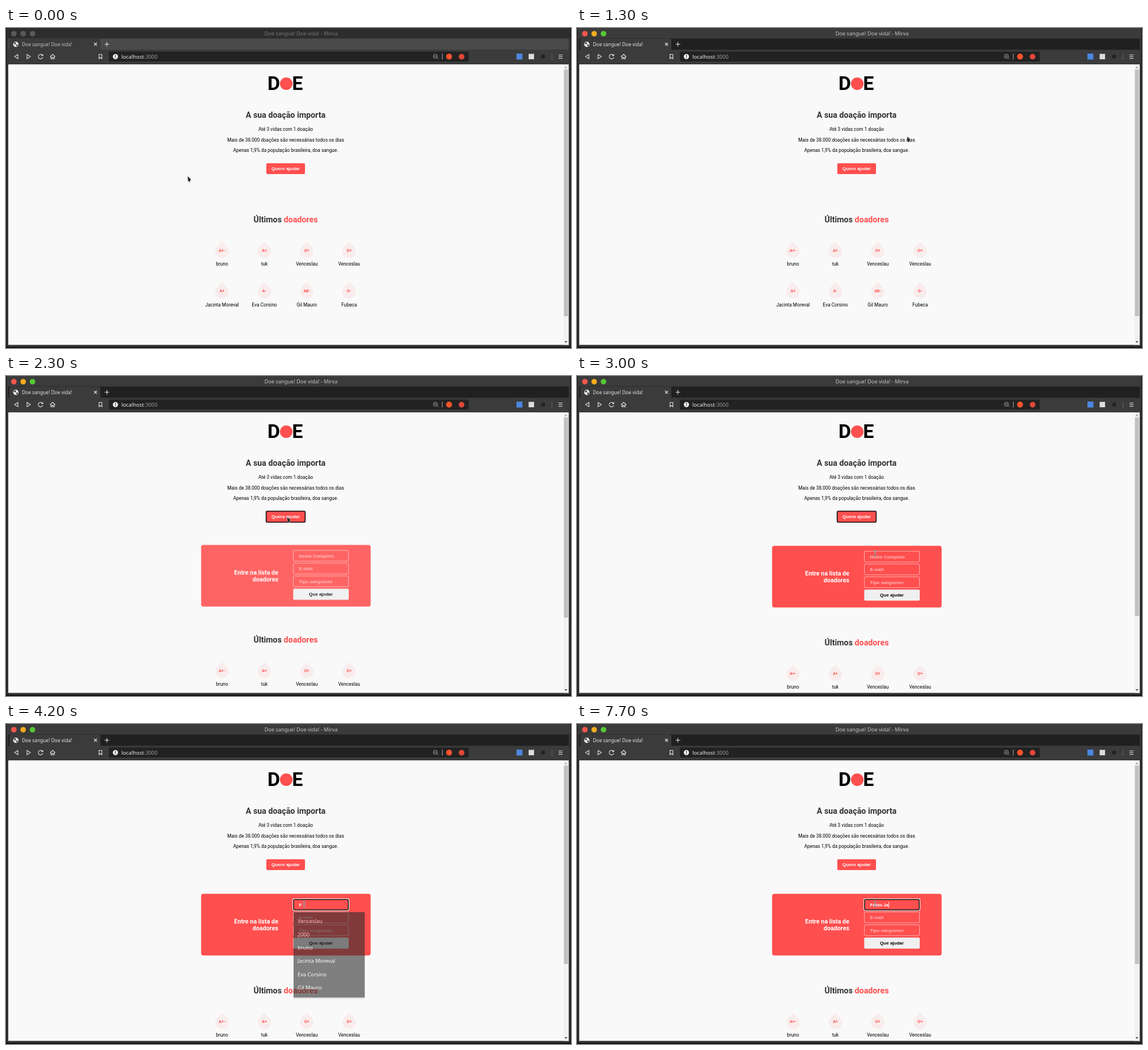
Animation, 994 px wide and 563 px high, one loop 8000 ms. Source, as an HTML page:

```html
<!DOCTYPE html>
<html lang="pt-BR">
<head>
<meta charset="utf-8">
<title>Doe sangue! Doe vida!</title>
<style>
html, body { margin: 0; width: 100%; height: 100%; overflow: hidden; background: #111; }
svg { display: block; width: 994px; height: 563px; }
text { font-family: Roboto, sans-serif; font-size: 8.35px; fill: #000; white-space: pre; }
.mid { text-anchor: middle; }
.ui { font-family: "Noto Sans", sans-serif; }
.ctl { font: bold 8px "Liberation Sans", Arial, sans-serif; }
.h2 { font-size: 14.25px; font-weight: 700; fill: #333; }
.logo { font-size: 34px; font-weight: 700; }
.type { font-size: 7px; font-weight: 700; fill: #ff4f4f; }
.hint { fill: #fff; opacity: .6; }
.line { fill: none; stroke: #e4e4e4; stroke-width: 1.1; }
.field { fill: none; stroke: #fff; stroke-opacity: .55; }

.anim { animation: 8s step-end infinite; }
#titlebar { animation-name: titlebar; }
#strip { animation-name: strip; }
#caption { animation-name: caption; }
#lights { animation-name: lights; }
#tabtext { animation-name: tabtext; }
#arrow { animation-name: arrow; }
#beam { animation-name: beam; }
#ring { animation-name: ring; }
#donors { animation-name: donors; }
#thumb { animation-name: thumb; }
#form { animation-name: form; }
#hint { animation-name: hint; }
#focus { animation-name: focus; }
#menu { animation-name: menu; }

@keyframes titlebar { 0% { fill: #2d2d2d } 3.75%, 100% { fill: #3b3b3b } }
@keyframes strip { 0% { fill: #4a4a4a } 3.75%, 100% { fill: #202020 } }
@keyframes caption { 0% { fill: #777 } 3.75%, 100% { fill: #c6c6c6 } }
@keyframes tabtext { 0% { fill: #c4c4c4 } 3.75%, 100% { fill: #e6e6e6 } }
@keyframes lights { 0% { opacity: 0 } 3.75%, 100% { opacity: 1 } }
@keyframes arrow {
  0% { transform: translate(319px, 260px); opacity: 1 }
  8.75% { transform: translate(345px, 290px) }
  10% { transform: translate(420px, 358px) }
  11.25% { transform: translate(530px, 389px) }
  12.5% { transform: translate(660px, 370px) }
  13.75% { transform: translate(741px, 290px) }
  15% { transform: translate(690px, 205px) }
  16.25% { transform: translate(580px, 190px) }
  17.5% { transform: translate(500px, 243px) }
  21.25% { transform: translate(494px, 247px); opacity: 1 }
  37.5%, 100% { transform: translate(494px, 247px); opacity: 0 }
}
@keyframes beam {
  0% { transform: translate(524.5px, 312px); opacity: 0 }
  37.5% { transform: translate(524.5px, 312px); opacity: 1 }
  38.75%, 100% { transform: translate(524.5px, 316.5px); opacity: 1 }
}
@keyframes ring { 0% { opacity: 0 } 25% { opacity: 1 } 38.75%, 100% { opacity: 0 } }
@keyframes donors {
  0% { transform: none }
  26.25% { transform: translateY(90px) }
  27.5% { transform: translateY(111px) }
  28.75% { transform: translateY(127px) }
  30%, 100% { transform: translateY(132px) }
}
@keyframes thumb {
  0% { height: 434px }
  26.25% { height: 373px }
  27.5% { height: 360px }
  28.75% { height: 352px }
  30%, 100% { height: 349px }
}
@keyframes form {
  0%, 26.25% { transform: translateY(-12px); opacity: 0 }
  27.5% { transform: translateY(-6px); opacity: .5 }
  28.75% { transform: translateY(-1.5px); opacity: .88 }
  30%, 100% { transform: none; opacity: 1 }
}
@keyframes hint { 0% { opacity: .6 } 38.75%, 100% { opacity: 0 } }
@keyframes focus { 0% { opacity: 0 } 38.75%, 100% { opacity: 1 } }
@keyframes menu {
  0% { opacity: 0 }
  38.75% { opacity: .6 }
  40% { opacity: 1 }
  52.5% { opacity: .6 }
  53.75%, 100% { opacity: 0 }
}
</style>
</head>
<body>
<svg viewBox="0 0 994 563">
  <defs>
    <clipPath id="view"><rect x="4" y="64" width="977" height="493.5"/></clipPath>
    <path id="drop" d="M0-16C3-11 12-6 12 1A12 12 0 0 1-12 1C-12-6-3-11 0-16Z" fill="#f9ecec"/>
  </defs>

  <!-- browser window -->
  <rect width="994" height="563" fill="#111"/>
  <rect x="1" width="992" height="561" rx="3" fill="#353535"/>
  <rect id="titlebar" class="anim" x="1" width="992" height="19" rx="3"/>
  <rect id="strip" class="anim" x="4" y="18.5" width="986" height="20"/>
  <path d="M6 39V21a2 2 0 0 1 2-2H164a2 2 0 0 1 2 2V39Z" fill="#3b3b3b"/>
  <rect x="4" y="38.5" width="986" height="25.5" fill="#3b3b3b"/>
  <g fill="#5b5b5b"><circle cx="13.8" cy="10" r="4.8"/><circle cx="30.2" cy="10" r="4.8"/><circle cx="46.6" cy="10" r="4.8"/></g>
  <g id="lights" class="anim">
    <circle cx="13.8" cy="10" r="4.8" fill="#f4564c"/>
    <circle cx="30.2" cy="10" r="4.8" fill="#f7ab1c"/>
    <circle cx="46.6" cy="10" r="4.8" fill="#53c932"/>
  </g>
  <text id="caption" class="anim ui mid" x="519" y="12.8" style="font-size:9.2px">Doe sangue! Doe vida! - Mirva</text>
  <circle cx="17.3" cy="28.7" r="4.7" fill="#eee"/>
  <path d="M14 26l3-1 1 2-2 2-2-1zM18 29l3 0-1 3-2 0z" fill="#444"/>
  <text id="tabtext" class="anim ui" x="28" y="31.8" style="font-size:8.4px">Doe sangue! Doe vida!</text>
  <path class="line" d="M155 26l5 5m0-5l-5 5M173.500 28.500h8m-4-4v8"/>
  <path class="line" d="M21 46.500v7.500l-6-3.750zM37 46.500v7.500l6-3.750zM64 48a4 4 0 1 0 .6 3.500M64.800 46v2.800h-2.800M77.500 50.500l4.500-4.200 4.500 4.200M79 50v4.300h2v-2.800h2v2.800h2V50M163.700 46.500h5v7.500l-2.500-2-2.500 2z"/>
  <rect x="181" y="41.500" width="633" height="17.500" rx="2" fill="#222"/>
  <circle cx="192.500" cy="50.300" r="4.600" fill="#eee"/>
  <path d="M192.500 47.500v3.200m0 1v1.300" stroke="#222" stroke-width="1.200"/>
  <text class="ui" x="203" y="53.500" style="font-size:9.4px;fill:#eee">localhost<tspan fill="#999">:3000</tspan></text>
  <path d="M759 52.500l2 2M753.500 49.800h4M752 49.800a3.500 3.500 0 1 0 7 0a3.500 3.500 0 1 0-7 0" fill="none" stroke="#aaa"/>
  <path d="M767.500 45v10.500" stroke="#aaa"/>
  <circle cx="779.500" cy="50.300" r="5.200" fill="#fb542b"/>
  <circle cx="801.500" cy="50.500" r="5" fill="#e0483a"/>
  <rect x="898" y="45" width="10.500" height="10.500" fill="#4a86e0"/>
  <rect x="919.500" y="45.500" width="9.500" height="9.500" fill="#ddd"/>
  <circle cx="945" cy="50.300" r="3.500" fill="#222"/>
  <path d="M960.500 45v11" stroke="#666"/>
  <path class="line" d="M972 47.500h7m-7 3h7m-7 3h7"/>

  <!-- page -->
  <rect x="4" y="64" width="986" height="493.500" fill="#f9f9f9"/>
  <rect x="981" y="64" width="9" height="493.500" fill="#f1f1f1"/>
  <rect id="thumb" class="anim" x="981.500" y="73" width="7.500"  fill="#c1c1c1"/>
  <path d="M982.500 70.500l2.500-3 2.500 3z" fill="#a0a0a0"/>
  <path d="M982.500 551l2.500 3 2.500-3z" fill="#505050"/>
  <g clip-path="url(#view)">
    <text class="logo" x="460" y="109">D</text>
    <circle cx="493" cy="98" r="11" fill="#ff4f4f"/>
    <text class="logo" x="503.300" y="109">E</text>
    <text class="h2 mid" x="492" y="158">A sua doação importa</text>
    <text class="mid" x="492" y="181.400">Até 3 vidas com 1 doação</text>
    <text class="mid" x="492" y="199.800">Mais de 38.000 doações são necessárias todos os dias</text>
    <text class="mid" x="492" y="217.900">Apenas 1,9% da população brasileira, doa sangue.</text>
    <rect x="458" y="238" width="68" height="19" rx="2" fill="#ff4f4f"/>
    <text class="ctl mid" x="492" y="249.800" style="fill:#fff">Quero ajudar</text>
    <rect id="ring" class="anim" x="457.700" y="237.700" width="68.600" height="19.600" rx="2" fill="none" stroke="#101010" stroke-width="1.600"/>

    <g id="donors" class="anim">
      <text class="h2 mid" x="492" y="342.200">Últimos <tspan fill="#ff4f4f">doadores</tspan></text>
    </g>

    <g id="form" class="anim">
      <rect x="343.300" y="298.700" width="298.200" height="108.500" rx="4" fill="#ff4f4f"/>
      <g text-anchor="end" style="font-weight:700">
        <text x="479" y="350.500" style="font-size:10.75px;fill:#fff">Entre na lista de</text>
        <text x="479" y="363" style="font-size:10.75px;fill:#fff">doadores</text>
      </g>
      <rect class="field" x="505.500" y="308.300" width="97" height="19" rx="2"/>
      <rect class="field" x="505.500" y="330.800" width="97" height="19" rx="2"/>
      <rect class="field" x="505.500" y="353.300" width="97" height="19" rx="2"/>
      <text id="hint" class="anim ctl hint" x="515.500" y="320.600">Nome Completo</text>
      <text class="ctl hint" x="515.500" y="343.100">E-mail</text>
      <text class="ctl hint" x="515.500" y="365.600">Tipo sanguíneo</text>
      <rect x="505.300" y="375.700" width="97.700" height="19.600" rx="2" fill="#efefef"/>
      <text class="ctl mid" x="554" y="388.200">Que ajudar</text>
      <g id="focus" class="anim" fill="none">
        <rect x="504.900" y="307.700" width="98.300" height="20.200" rx="2.500" stroke="#fff" stroke-width="1.600"/>
        <rect x="505.900" y="308.700" width="96.300" height="18.200" rx="2" stroke="#101010" stroke-width="1.500"/>
        <text id="typed" class="ctl" x="515.500" y="320.600" style="fill:#fff"></text>
        <rect id="caret" y="313" width=".9" height="10" fill="#fff"/>
      </g>
    </g>
  </g>

  <g id="menu" class="anim">
    <rect x="505" y="331" width="127" height="153" rx="2" fill="#000" opacity=".12"/>
    <rect x="506" y="331" width="125" height="150.300" rx="1" fill="#2d2d2d"/>
  </g>

  <path id="arrow" class="anim" d="M.5.500L6.500 6 4.200 11.500.8 8.500Z" fill="#2b2b2b" stroke="#fff" stroke-opacity=".75" stroke-width=".6"/>
  <g id="beam" class="anim" fill="none">
    <path d="M-2-4.500H2M0-4.500V4.500M-2 4.500H2" stroke="#fff" stroke-width="2.200" stroke-opacity=".75"/>
    <path d="M-1.600-4.500H1.600M0-4.500V4.500M-1.600 4.500H1.600" stroke="#333" stroke-width=".9"/>
  </g>
</svg>
<script>
const $ = id => document.getElementById(id);

function add(parent, tag, attrs, content = '') {
  const el = document.createElementNS('http://www.w3.org/2000/svg', tag);
  for (const key in attrs) el.setAttribute(key, attrs[key]);
  el.textContent = content;
  parent.append(el);
}

const donors = [
  ['A+-', 'bruno'], ['A+', 'tuk'], ['O+', 'Venceslau'], ['O+', 'Venceslau'],
  ['A+', 'Jacinta Moreval'], ['A-', 'Eva Corsino'], ['AB-', 'Gil Mauro'], ['O-', 'Fubeca']
];
donors.forEach(([type, name], i) => {
  const x = 380 + i % 4 * 74.55, y = 391.5 + Math.floor(i / 4) * 71.3;
  add($('donors'), 'use', { href: '#drop', x, y });
  add($('donors'), 'text', { class: 'type mid', x, y: y + 2.5 }, type);
  add($('donors'), 'text', { class: 'mid', x, y: y + 26.8 }, name);
});

['Venceslau', '2000', 'bruno', 'Jacinta Moreval', 'Eva Corsino', 'Gil Mauro'].forEach((name, i) =>
  add($('menu'), 'text', { class: 'ui', x: 513, y: 350.3 + i * 23.3, style: 'font-size:9.25px;fill:#fff' }, name));

// [time, letters typed] and [from, to] spans with the caret off
const NAME = 'Feldo Ja';
const keys = [[3700, 1], [5600, 2], [5900, 4], [6100, 5], [6300, 6], [7000, 7], [7700, 8]];
const blinks = [[4200, 4800], [5400, 5600], [7500, 7700]];
let start;

function draw(now) {
  start ??= now;
  const t = (now - start) % 8000;
  const count = keys.reduce((n, [at, len]) => t >= at ? len : n, 0);
  const text = NAME.slice(0, count);
  if ($('typed').textContent !== text) $('typed').textContent = text;
  $('caret').setAttribute('x', 515.3 + (count ? $('typed').getComputedTextLength() : 0));
  $('caret').setAttribute('opacity', blinks.some(([a, b]) => t >= a && t < b) ? 0 : 1);
  requestAnimationFrame(draw);
}
requestAnimationFrame(draw);
</script>
</body>
</html>
```
